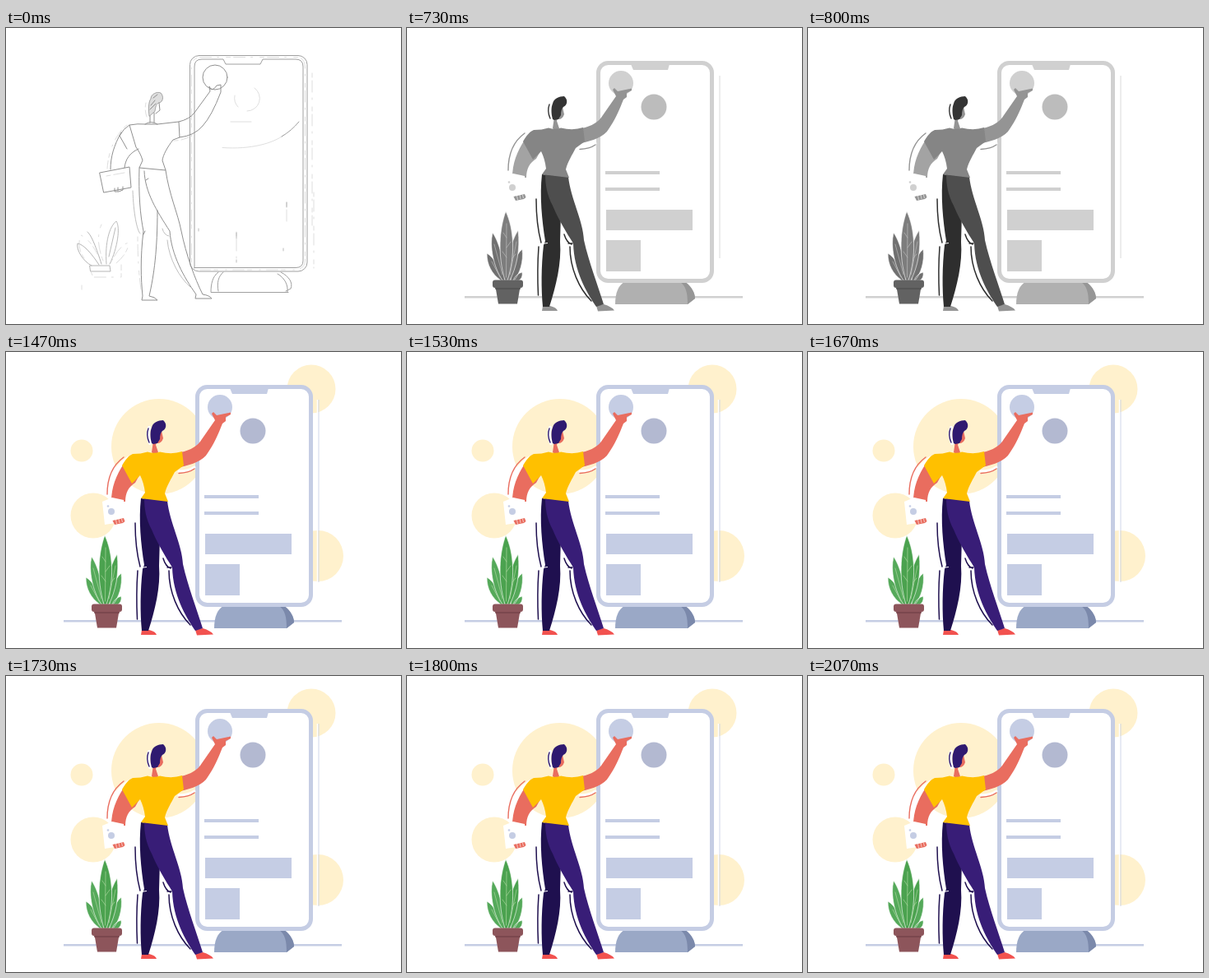
Write an HTML page that moves like this. It is 480 by 360 pixels and loops after 2.19 s.

```html
<!DOCTYPE html>
<html lang="en">
<head>
<meta charset="utf-8">
<title>From sketch to colour</title>
<style>
html, body { margin: 0; width: 100%; height: 100%; overflow: hidden; background: #fff; }
svg { display: block; width: 100%; height: 100%; }
.gray {
  --pale: #fff; --light: #d0d0d0; --disc: #bcbcbc; --base: #b0b0b0; --shade: #969696;
  --shirt: #858585; --skin: #949494; --arm: #a3a3a3; --hair: #343434; --leg: #4e4e4e; --dark: #2e2e2e;
  --shoe: #949494; --leaf: #7d7d7d; --leaf2: #707070; --pot: #626262; --rim: #555; --vein: #c4c4c4;
}
.color {
  --pale: #fff1cd; --light: #c5cde4; --disc: #b3b9d1; --base: #9aa8c6; --shade: #7b89ab;
  --shirt: #ffc000; --skin: #e96d5f; --arm: #e96d5f; --hair: #2f1a70; --leg: #381d77; --dark: #1f104f;
  --shoe: #f2524f; --leaf: #4ba24f; --leaf2: #55a95a; --pot: #8d555b; --rim: #7b474e; --vein: #b9dfa9;
}
.sketch #art, svg:not(.sketch) #draft { display: none; }
#draft { fill: none; stroke: #a0a0a0; stroke-linecap: round; stroke-linejoin: round; }
.faint { stroke: #d6d6d6; stroke-width: .8; }
.dotted { stroke-dasharray: 5 4 14 7 2 9; }
.pale { fill: var(--pale); }
.light { fill: var(--light); }
.skin { fill: var(--skin); }
.arm { fill: var(--arm); }
.hair { fill: var(--hair); }
.leg { fill: var(--leg); }
.dark { fill: var(--dark); }
.shoe { fill: var(--shoe); }
.leaf { fill: var(--leaf); }
.leaf2 { fill: var(--leaf2); }
.white { fill: #fff; }
.line { fill: none; stroke-linecap: round; }
</style>
</head>
<body>
<svg class="sketch" viewBox="0 0 480 360">
<g id="draft">
  <!-- device -->
  <rect x="223.500" y="33.500" width="142.500" height="262.500" rx="11"/>
  <path d="M229 292V47Q229 38 238 38H264L267 44H309L312 38H352Q361 38 361 47V283Q361 291.500 352 291.500H229"/>
  <path class="faint dotted" d="M225.500 285V46Q226 36 237 35.500H354Q363 36 363.500 48V283Q363 293 352 294H236"/>
  <path class="faint dotted" d="M372 55V240M374 200V292M280 248V288M341 212V240"/>
  <path d="M280 249V256M280 282V285M341 212V218M337 268V271M234 244V247" stroke-width=".7"/>
  <path class="faint" d="M278 82A15.500 15.500 0 0 0 282 96M293 101A15.500 15.500 0 0 0 302 73M273 114H298M263 145.500C298 148 325 140 338 130"/>
  <path d="M335 132Q347 125 356 114"/>
  <path d="M258 297C251 302 249 311 249 321.500H343M334 297C344 302 349 310 346 317L340 320M330 299C339 304 343 313 342 321M258 320C256 310 258 302 264 297"/>
  <circle cx="254" cy="60" r="15" stroke="#919191"/>
  <!-- figure -->
  <g stroke="#909090">
    <path d="M174 107C173 99 173 90 176 86C176 80 184 77 188 79C192 83 191 90 186 91C182 92 182 96 181 101Z" fill="#dedede" stroke-width=".8"/>
    <path d="M186 91L187 100L182 104M175 107V115M180 103V115M169 117Q176 112 184 117M176 94L181 88M175 99L182 92M179 85L184 81"/>
    <path d="M150 118Q160 116 170 117H184L210 114L211 133L203 136C196 145 191 154 190 161L194 173L162 170L166 161C164 154 161 149 158 145L150 118Q143 122 138 131L147 147"/>
    <path d="M140 127C131 143 127 157 127 172M161 147C150 152 145 160 144 170M210 114Q223 111 229 103L248 77L247 71Q250 79 256 70L261 69L261 78Q250 107 239 119Q229 131 211 133"/>
    <path d="M114 176L150 169L152 194L119 200ZM132 195V199Q137 200 142 197V193M136 194V198"/>
    <path d="M162 170C161 202 163 227 167 247C163 280 164 305 166 326L165 331H184Q181 327 174 326C180 300 184 270 184 222"/>
    <path d="M194 173C198 202 209 226 213 247C219 276 229 304 239 324Q247 325 250 329H230L231 324C216 303 201 276 199 247C183 222 169 200 168 174"/>
    <path d="M170 185L173 183M167 251L169 247"/>
  </g>
  <path class="faint dotted" d="M147 118C133 129 124 151 123 171M204 137Q216 137 225 131M170 91Q168 100 171 108M122 180L144 176M160 254Q160 290 164 318"/>
  <path d="M154 198C155 225 159 246 163 250M190 244Q192 252 198 253M196 258C198 281 211 304 224 315" stroke="#c0c0c0"/>
  <!-- plant -->
  <path d="M102 289H126L127 296H103ZM113 288C104 274 94 263 87 262C85 270 94 284 104 289M116 287C110 268 104 252 99 248" stroke="#b5b5b5"/>
  <path d="M122 287C120 260 126 241 134 235C139 242 136 267 126 287M125 278L133 243" stroke="#bbb"/>
  <path class="faint dotted" d="M95 280Q85 266 91 252Q102 257 111 275M118 283Q108 258 116 239M127 286Q138 264 149 261Q148 276 130 289M103 296L106 303H140V288M92 313V318"/>
</g>

<g id="art">
  <g class="pale">
    <circle cx="186" cy="115" r="58"/>
    <circle cx="92" cy="120" r="13.500"/>
    <circle cx="106" cy="199" r="27.500"/>
    <circle cx="371" cy="45" r="29.500"/>
    <circle cx="379" cy="248" r="31"/>
  </g>
  <path class="light" d="M70 326H408V328.500H70Z"/>
  <path d="M378.500 58V280" stroke="#fff" stroke-width="1.500"/>
  <path d="M380 58V280" stroke="var(--light)" opacity=".8"/>
  <!-- device -->
  <path d="M253 336C253 322 257 313 264 309H338C346 314 350 323 350 329L341 336Z" fill="var(--base)"/>
  <path d="M332 309H338C346 314 350 323 350 329L341 336C341 322 339 314 332 309Z" fill="var(--shade)"/>
  <rect x="232.500" y="42.500" width="138" height="265" rx="12" fill="#fff" stroke="var(--light)" stroke-width="5"/>
  <g class="light">
    <path d="M272 44H319L317 51H275Z"/>
    <circle cx="260" cy="67" r="15"/>
    <path d="M241 174H307V178H241ZM241 194H307V198H241ZM242 221H347V246H242ZM242 258H284V296H242Z"/>
  </g>
  <circle cx="300" cy="96" r="15.500" fill="var(--disc)"/>
  <!-- plant -->
  <g stroke="#fff" stroke-width=".6">
    <path class="leaf2" d="M114 307C103 299 97 288 97 274C106 279 113 292 116 307ZM126 307C126 292 131 277 140 269C142 284 137 299 130 307ZM129 307Q132 299 140 297Q141 304 136 307Z"/>
    <path class="leaf2" d="M116 307C105 290 100 266 104 249C112 260 118 284 119 307Z"/>
    <path class="leaf" d="M122 307C120 285 126 260 135 246C138 269 133 291 125 307Z"/>
    <path class="leaf" d="M119 307C110 276 112 245 120 223C130 244 132 277 122 307Z"/>
  </g>
  <path class="line" d="M121 238L120.500 303M121 255L117 249M121 267L126 260M121 279L116 272M106 263L116 300M133 260L125 300M128 280L132 275M103 284L113 303" stroke="var(--vein)" stroke-width=".6"/>
  <path d="M107 312H138L134 335.500H111Z" fill="var(--pot)"/>
  <rect x="104" y="306.500" width="37" height="9.500" rx="3" fill="var(--pot)"/>
  <path d="M107 316H138L137.500 318H107.500Z" fill="var(--rim)"/>
  <!-- figure -->
  <path class="shoe" d="M165 338H174Q182 340 183 344H164ZM230 338L239 336Q249 339 252 343.500L232 344.500Z"/>
  <path class="dark" d="M164 178C161 204 164 234 168 259L166 264C163 290 163 317 165 339H173C181 314 188 286 186 260L187 225L182 180Z"/>
  <path class="leg" d="M168 178L196 181C199 208 214 234 215 258C221 285 232 313 239 336L230 339C218 321 203 296 202 262L199 257C190 243 181 226 177 216C170 203 168 190 168 178Z"/>
  <path d="M163 262.500L171 261.500" stroke="#fff"/>
  <g class="line" stroke="var(--dark)" stroke-width="1.500">
    <path d="M157 208C157 230 159 246 163 261M160 266Q158 295 159.500 325"/>
    <path d="M191 251Q194 261 200 263M196 262H201M198 266C198 292 209 317 224 332"/>
  </g>
  <path class="white" d="M149 126C131 137 123 155 123 176L129 178C128 164 134 150 143 138Z"/>
  <path class="arm" d="M143 136C134 150 128 164 128 182H145C145 171 149 164 157 159L162 150Z"/>
  <path class="skin" d="M212 122Q231 118 238 106L254 83L250 75L252 73L256 77L273 73.500V76L267 79V84L263 87C258 100 252 113 245 123C240 132 226 137 212 140Z"/>
  <path class="skin" d="M179 108H184L182 113L185 122Q181 126 177 122ZM184 96H189L191 105Q189 111 184 111Z"/>
  <path class="line" d="M174 92Q171 101 175 111" stroke="#fff" stroke-width="4"/>
  <path class="hair" d="M177 111C175 104 175 96 177 92C178 86 185 83 191 83C196 87 195 94 190 96Q187 99 187 106L184 111L179 112Z"/>
  <path class="line" d="M173 93Q170 101 174 110" stroke="var(--hair)" stroke-width="1.400"/>
  <path d="M154 124Q164 124 172 121.500Q180 124 187 121.500Q202 125 214 121L216 138L205 146C201 154 195 163 193 172L197 182L164 178L169 171C168 163 166 156 163 150L153 160L141 138C145 131 149 126 154 124Z" fill="var(--shirt)"/>
  <path class="line" d="M210 145Q222 145 229 140" stroke="#fff" stroke-width="3"/>
  <path class="line" d="M143 128C129 138 123 155 123 173M210 147.500Q222 147 229 142" stroke="var(--skin)" stroke-width="1.400"/>
  <path class="white" d="M117 182L129 177L143 180L145 206L120 210Z"/>
  <circle class="light" cx="128" cy="194" r="4"/>
  <circle class="light" cx="124" cy="187.500" r="1.300"/>
  <path class="skin" d="M129.500 205L143 202L144.500 206L142 208L132 210Z"/>
  <path d="M133.500 204L134.500 209M137 203L138 208M140.500 203L141.500 207" stroke="#fff" stroke-width=".6"/>
</g>
</svg>
<script>
const svg = document.querySelector("svg");
function draw() {
  const t = performance.now() % 2190;
  svg.setAttribute("class", t < 730 ? "sketch" : t < 1470 ? "gray" : "color");
  requestAnimationFrame(draw);
}
draw();
</script>
</body>
</html>
```
